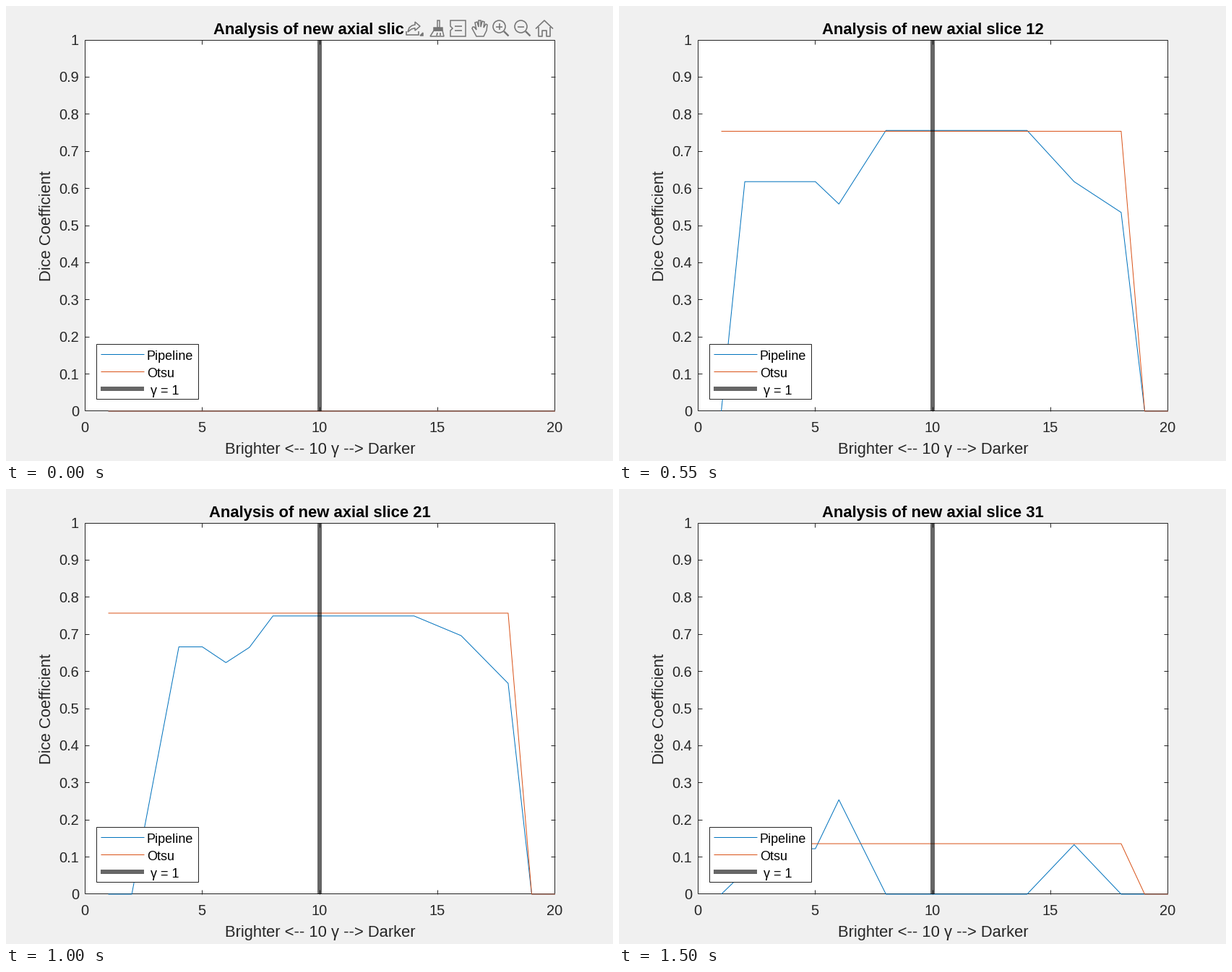
A matplotlib script for the animation above (1.55 s loop, 840 by 630 pixels).

```python
import numpy as np
import matplotlib.pyplot as plt
from matplotlib.animation import FuncAnimation
from matplotlib.patches import Circle, Polygon, Rectangle

W, H = 840, 630
LEFT, RIGHT, TOP, BOTTOM = 109, 760, 47, 561
TICK = 6
BACK, INK, ICON = "#f0f0f0", "#262626", "#757575"
BLUE, RED = "#0072BD", "#D95319"
SLICES, STEP_MS = 31, 50
BLANK_SLICES = 3

plt.rcParams["font.family"] = "Liberation Sans"

# Height of the flat Otsu curve at key slices
LEVEL = {3: 0, 7: 0.546, 12: 0.754, 17: 0.769, 21: 0.757, 25: 0.708,
         31: 0.136}

# Pipeline curve relative to that level: ramp start and end, shelf height,
# place and height of the turn after it, plateau, knee and end of the tail
SHAPE = {
    7: (1, 3, 0.65, 7, 0.12, 0.975, 0.94, 0.915),
    12: (1, 2, 0.82, 6, 0.74, 1.003, 0.82, 0.71),
    17: (3, 4.4, 0.77, 6, 0.85, 1.005, 0.87, 0.73),
    21: (2, 4, 0.88, 6.3, 0.80, 0.99, 0.92, 0.75),
    25: (1, 2, 0.727, 5, 0.654, 0.973, 0.93, 0.56),
    31: (1, 3, 0.90, 6, 1.87, 0, 0.98, 0),
}

steps = np.arange(1, 21)


def curves(n):
    level = np.interp(n, list(LEVEL), list(LEVEL.values()))
    start, rise, shelf, turn_x, turn, plateau, knee, end = (
        np.interp(n, list(SHAPE), column) for column in zip(*SHAPE.values()))
    x = [start, rise, turn_x - 1, turn_x, 8, 14, 16, 18, 19]
    y = [0, shelf, shelf, turn, plateau, plateau, knee, end, 0]
    otsu = np.where(steps < 19, level, 0)
    return level * np.interp(steps, x, y), otsu


def px(gamma):
    return LEFT + gamma / 20 * (RIGHT - LEFT)


def py(dice):
    return BOTTOM - dice * (BOTTOM - TOP)


# Everything is placed in pixels from the top left corner
fig = plt.figure(figsize=(W / 72, H / 72), dpi=72, facecolor=BACK)
ax = fig.add_axes([0, 0, 1, 1])
ax.set(xlim=(0, W), ylim=(H, 0))
ax.axis("off")


def line(x, y, color, lw=1, **kw):
    return ax.plot(x, y, color=color, lw=lw, solid_capstyle="butt", **kw)[0]


def box(x0, y0, x1, y1, **kw):
    return ax.add_patch(Rectangle((x0, y0), x1 - x0, y1 - y0, **kw))


def label(x, y, text, size, color=INK, ha="center", **kw):
    return ax.text(x, y, text, fontsize=size, color=color, ha=ha,
                   va="baseline", **kw)


# Plot box, ticks and labels
box(LEFT, TOP, RIGHT - 1, BOTTOM - 1, fc="white", ec=INK, lw=1)
for v in range(0, 21, 5):
    label(px(v) - 0.5, 590, str(v), 20)
    if 0 < v < 20:
        for a, b in [(TOP, TOP + TICK), (BOTTOM - TICK, BOTTOM)]:
            line([px(v) - 0.5] * 2, [a, b], INK)
for k in range(11):
    label(101, py(k / 10) + 7, f"{k / 10:g}", 20, ha="right")
    if 0 < k < 10:
        for a, b in [(LEFT, LEFT + TICK), (RIGHT - TICK, RIGHT)]:
            line([a, b], [py(k / 10) - 0.5] * 2, INK)
label(434.5, 620, "Brighter <-- 10 γ --> Darker", 22)
label(62, 304.5, "Dice Coefficient", 22, rotation=90, rotation_mode="anchor")
title = label(434.5, 39, "", 22, "black", weight="bold")

# Curves and the gamma marker
blue_line = line([], [], BLUE, zorder=3, snap=False)
red_line = line([], [], RED, zorder=3, snap=False)
line([434, 434], [TOP, BOTTOM], "black", 6, alpha=0.6, zorder=4)

# Legend
box(125, 468, 266, 544, fc="white", ec=INK, lw=1, zorder=5)
for y, text, color, width, x in [(482, "Pipeline", BLUE, 1, 195),
                                 (506, "Otsu", RED, 1, 195),
                                 (530, "γ = 1", "#666666", 6, 200.5)]:
    line([131, 191], [y, y], color, width, zorder=6)
    label(x, y + 8.5, text, 18, "black", ha="left", zorder=6)

# Toolbar
toolbar = [box(551, 19, 758, 46, color=BACK, lw=0, zorder=7)]


def stroke(*points, lw=1.6):
    toolbar.append(line(*zip(*points), ICON, lw, zorder=8))


def shape(*points, fill="none"):
    toolbar.append(ax.add_patch(
        Polygon(points, fc=fill, ec=ICON, lw=1.5, zorder=8)))


def magnifier(x, plus):
    toolbar.append(ax.add_patch(
        Circle((x, 28.5), 8.5, fc="none", ec=ICON, lw=1.6, zorder=8)))
    stroke((x + 6.5, 35), (x + 13, 41.5), lw=2.4)
    stroke((x - 4.5, 28.5), (x + 4.5, 28.5))
    if plus:
        stroke((x, 24), (x, 33))


# Export
shape((556, 36), (558, 30), (562, 27), (566, 26), (566, 22), (573, 28),
      (566, 34), (566, 30.5), (561, 32))
stroke((554, 35), (554, 40), (571, 40), (571, 35))
shape((573, 41), (577, 37), (577, 41), fill=ICON)
# Brush
shape((597, 20), (600, 20), (600, 30), (597, 30))
shape((592, 30), (604, 30), (604, 34), (592, 34), fill=ICON)
shape((592, 34), (604, 34), (606, 42), (587, 42))
stroke((596, 41), (597, 37))
stroke((601, 41), (601, 37))
# Data tip
shape((615, 20), (636, 20), (636, 42), (615, 42), (615, 34), (618, 31),
      (615, 28))
stroke((621, 28), (631, 28))
stroke((621, 34), (631, 34))
# Hand
shape((651, 42), (645, 31), (646, 29), (648, 29), (651, 33), (649, 23),
      (652, 22), (654, 29), (654, 20), (657, 20), (657, 29), (659, 21),
      (662, 22), (661, 30), (664, 25), (666, 26), (665, 34), (661, 42))
magnifier(682.5, True)
magnifier(712.5, False)
# Home
stroke((733, 31.5), (745, 20), (757, 31.5))
stroke((737, 29), (737, 42), (742, 42), (742, 34), (748, 34), (748, 42),
       (753, 42), (753, 29))


def draw(i):
    n = i + 1
    pipeline, otsu = curves(n)
    blue_line.set_data(px(steps), py(pipeline))
    red_line.set_data(px(steps), py(otsu))
    title.set_text(f"Analysis of new axial slice {n}")
    for part in toolbar:
        part.set_visible(n <= BLANK_SLICES)
    return [blue_line, red_line, title, *toolbar]


anim = FuncAnimation(fig, draw, frames=SLICES, interval=STEP_MS,
                     repeat=True, repeat_delay=0, blit=False)
plt.show()
```
